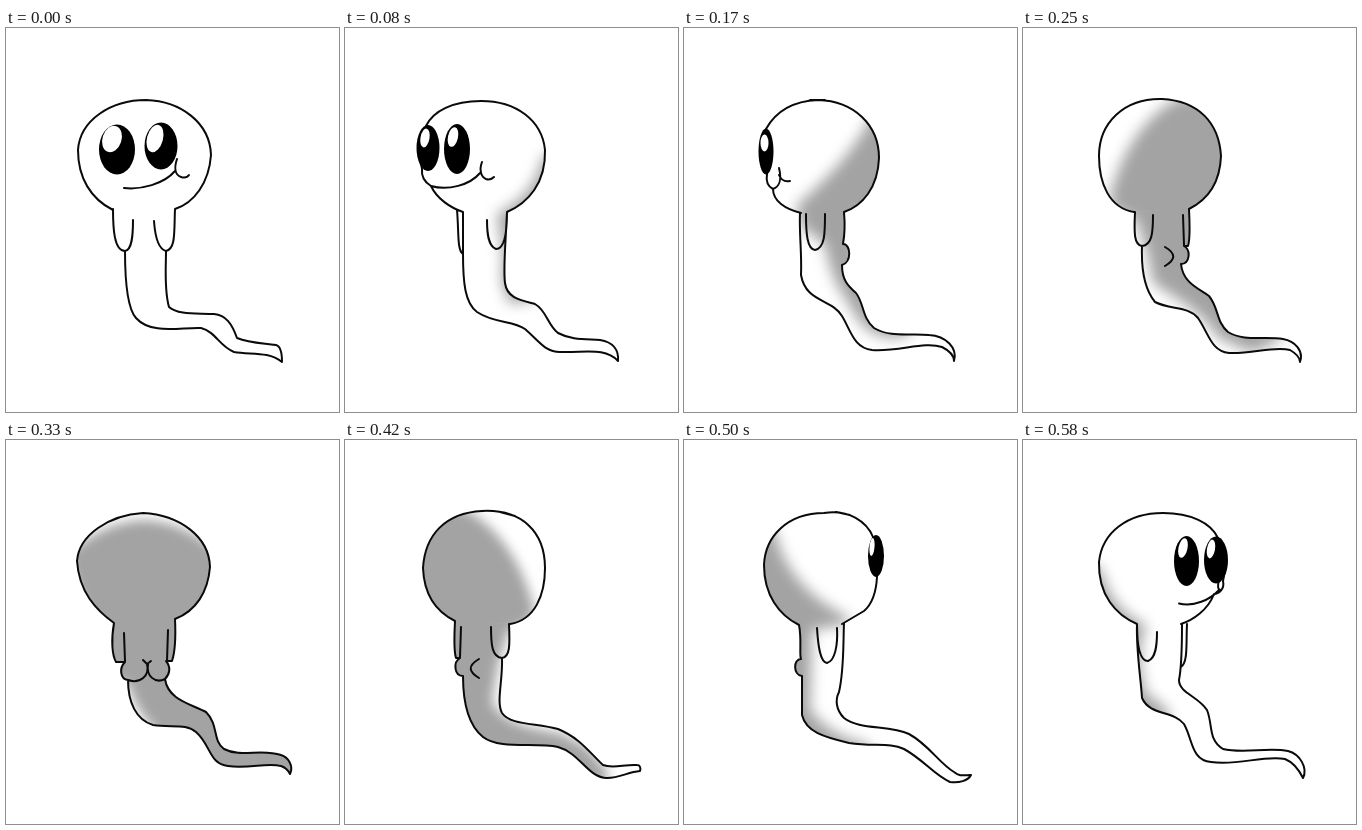
An HTML page for the animation above (660 ms loop, 333x384 px).

```html
<!DOCTYPE html>
<html lang="en">
<head>
<meta charset="utf-8">
<title>Spinning tadpole</title>
<style>
html, body { margin: 0; width: 100%; height: 100%; overflow: hidden; background: #fff; }
svg { display: block; width: 100vw; height: 100vh; }
.line { fill: none; stroke: #0a0a0a; stroke-width: 2; stroke-linecap: round; stroke-linejoin: round; }
</style>
</head>
<body>
<svg id="stage" viewBox="0 0 333 384"></svg>
<script>
const LOOP = 660;

// One pose per turn step. eye: [cx, cy, rx, ry, glint cx, cy, rx, ry, tilt]
const poses = [
  { at: 0,
    head: 'M107 182C85 171 72 150 72 122C74 92 105 72 140 72C175 73 204 95 205 127C203 155 188 175 169 181',
    body: 'M107 181C107 200 108 223 119 223C119 250 121 280 130 290C145 307 175 299 195 300C210 304 213 318 228 324C245 327 262 323 276 334C276 325 274 318 270 317C255 315 243 315 231 310C226 296 220 287 208 286C190 285 172 287 163 279C158 262 160 240 160 223C170 221 168 203 169 181',
    lines: 'M119 223C126 222 127 208 127 192M148 193C149 207 152 221 160 223M118 160C135 162 158 156 169 143M171 131C168 140 169 147 175 149C178 150 181 150 183 147',
    eyes: [[111, 121.5, 18, 25, 106, 111, 9.5, 13.5, 18], [155, 118, 16.5, 23.5, 149, 110.5, 8, 14, 15]] },
  { at: 80,
    head: 'M162 184C183 175 201 155 200 122C197 92 171 73 136 73C108 73 88 83 81 98L74 125L77 141C76 150 81 155 86 158C92 171 106 180 118 184',
    body: 'M118 184L118 226C118 255 120 275 132 284C150 296 168 292 180 301C195 314 200 324 215 324C240 325 260 319 273 333C274 322 268 314 255 312C240 311 226 312 213 305C202 296 202 283 190 276C175 272 162 270 160 255C158 240 161 210 162 184',
    lines: 'M142 192C142 205 143 218 151 221C159 221 162 205 162 184M118 226C112 222 114 205 112 182M86 158C103 163 125 157 135 145M137 134C134 142 136 149 141 151C144 152 147 151 149 149',
    shade: 'M216 125L198 128C192 158 174 175 152 186L158 225L157 255L165 276L195 270L186 210Z',
    eyes: [[112, 121, 13, 25, 108, 109, 5, 10, 12], [83, 120, 11.5, 23, 80, 110, 4.5, 9.5, 10]] },
  { at: 170,
    head: 'M117 185C101 181 89 173 89 161C83 158 82 152 83 146L82 101C92 83 110 73 134 72C170 73 195 97 195 130C194 160 178 178 160 184',
    body: 'M116 185C115 205 118 225 117 247C122 275 147 270 158 288C167 303 170 320 188 322C215 324 240 313 258 319C266 323 270 328 270 333C274 320 262 308 245 307C225 305 207 310 190 300C178 290 180 275 172 265C164 258 158 252 158 237C168 234 167 216 159 216C161 205 161 195 160 184',
    lines: 'M122 186C122 205 123 221 131 222C141 220 141 205 141 186M89 161C95 159 98 152 95 140M95 147C97 152 101 154 106 153M126 72L141 72',
    shade: 'M210 70L188 88C172 118 150 145 112 178L118 200L140 215C146 240 150 255 160 268C170 285 176 300 192 306C205 312 215 310 225 306L230 295L190 280L175 230L170 190L215 170Z',
    eyes: [[82, 123.5, 7.5, 23, 80.5, 115, 4, 8.5, 0]] },
  { at: 250,
    head: 'M166 181C184 172 197 155 198 128C196 95 176 73 139 71C101 70 76 95 76 128C76 155 86 180 111 184',
    body: 'M112 184C111 205 111 217 119 218C118 245 122 262 132 274C148 282 165 278 175 290C186 306 188 323 206 325C230 326 250 318 267 322C274 326 277 330 277 334C281 323 272 313 260 311C240 308 222 314 205 304C193 294 196 280 186 268C175 260 160 255 158 236C167 236 168 222 161 218L165 218C167 212 167 200 166 181',
    lines: 'M160 187L161 217M142 219C154 226 152 232 142 238M119 218C129 217 130 205 130 187',
    shade: 'M216 60L155 70C118 90 96 130 86 172L96 186L112 190L124 225L130 255C160 275 180 285 195 310L230 325L260 310L200 240L216 200Z' },
  { at: 330,
    head: 'M108 183C90 170 73 152 71 121C73 95 103 75 137 73C173 75 203 96 204 127C202 152 190 171 169 179',
    body: 'M108 183C105 200 106 215 110 222L119 222C113 228 114 239 122 240C122 262 130 280 147 285C165 288 180 283 190 292C205 305 203 324 222 326C243 329 262 322 275 326C281 328 283 332 284 334C288 326 282 317 275 315C255 308 235 318 218 309C206 300 213 285 200 272C185 264 162 260 159 239C164 234 165 227 160 221L166 221C168 215 170 200 169 179',
    lines: 'M118 193L119 221M162 190L161 221M122 240C134 244 144 236 141 224M142 224C140 236 149 244 159 239M137 220L141 224L145 221',
    shade: 'M60 114C85 94 108 81 138 80C168 81 192 94 215 114L215 190L300 300L300 345L200 345L158 300C138 280 126 262 122 243L100 245Z',
    blur: 6 },
  { at: 420,
    head: 'M110 181C92 172 79 155 78 128C80 95 100 73 137 71C177 69 200 92 200 128C200 155 190 180 165 184',
    body: 'M110 181C109 200 109 212 111 218L115 218C108 222 109 236 118 236C118 262 123 285 138 297C155 310 190 302 213 307C235 313 243 338 262 338C275 338 283 332 295 331C296 328 295 325 292 325C280 324 268 329 258 325C245 313 235 298 213 289C190 283 165 285 157 273C151 262 158 240 157 218C165 217 165 205 164 184',
    lines: 'M116 187L115 217M134 219C122 226 124 232 134 238M146 187C146 205 147 217 157 218M155 72L170 76',
    shade: 'M60 60L121 70C158 90 180 130 190 172L180 186L164 190L153 225L147 262C156 280 178 288 215 293L242 307L262 330L262 345L110 330L60 200Z',
    blur: 6 },
  { at: 500,
    head: 'M115 185C95 175 80 155 80 125C81 97 103 73 140 73C165 69 183 82 189 97L193 137C192 155 187 165 180 171L158 184',
    body: 'M115 185C118 200 115 215 117 219C109 219 109 235 118 236L118 275C122 292 140 297 165 303C190 307 205 302 220 309C240 320 250 335 266 342C275 343 284 341 287 335C280 335 276 337 270 332C255 323 245 305 225 294C205 285 175 290 160 278C152 270 151 260 155 252C160 230 159 210 160 183',
    lines: 'M133 188C134 205 136 222 143 223C151 221 154 205 153 188M152 72L166 75',
    shade: 'M60 85L90 88C98 125 120 155 165 178L165 184L128 190L126 270C140 288 160 300 185 304L185 320L100 310L60 200Z',
    eyes: [[192, 116, 8, 21, 188, 107, 2.5, 9, 5]] },
  { at: 580,
    head: 'M114 184C93 175 75 155 76 122C79 92 105 73 140 73C168 73 188 83 195 98L203 125L200 141C202 150 195 154 191 154C185 170 170 180 158 184',
    body: 'M114 184C113 210 118 240 119 258C127 276 150 270 161 284C170 300 168 320 188 322C215 326 240 315 262 319C272 323 277 332 280 338C285 328 277 314 265 311C245 307 220 314 200 309C185 300 190 285 184 270C175 256 156 253 156 240C158 230 159 220 159 184',
    lines: 'M114 184C114 205 117 221 125 221C133 218 134 205 134 192M158 227C165 222 163 205 164 184M156 163.5C171 167 187 160 196 150M196 141C194 146 195 150 198 150',
    shade: 'M60 125L78 128C84 158 102 175 124 186L118 200L117 225L122 252L145 270L145 290L90 270Z',
    eyes: [[163.5, 121, 12.5, 25, 160, 108, 4.5, 10, 12], [193, 120, 12, 23.5, 188, 109, 4, 9.5, 10]] }
];

const stage = document.getElementById('stage');

const ellipse = (x, y, rx, ry, fill, tilt = 0) =>
  `<ellipse cx="${x}" cy="${y}" rx="${rx}" ry="${ry}" fill="${fill}" transform="rotate(${tilt} ${x} ${y})"/>`;

const drawEye = ([x, y, rx, ry, gx, gy, grx, gry, tilt]) =>
  ellipse(x, y, rx, ry, '#000') + ellipse(gx, gy, grx, gry, '#fff', tilt);

function drawPose({ head, body, lines, shade, blur = 7, eyes = [] }, i) {
  const shading = shade ? `
    <clipPath id="skin${i}"><path d="${head}"/><path d="${body}"/></clipPath>
    <filter id="soft${i}" filterUnits="userSpaceOnUse" x="0" y="0" width="333" height="384" color-interpolation-filters="sRGB">
      <feGaussianBlur stdDeviation="${blur}"/>
    </filter>
    <g clip-path="url(#skin${i})"><path d="${shade}" fill="#a3a3a3" filter="url(#soft${i})"/></g>` : '';
  return `<g visibility="hidden">${shading}
    <path class="line" d="${head}${body}${lines}"/>${eyes.map(drawEye).join('')}</g>`;
}

stage.innerHTML = poses.map(drawPose).join('');
const layers = [...stage.children];
let shown = -1;

function render(ms) {
  const t = ms % LOOP;
  const now = poses.filter(p => p.at <= t).length - 1;
  if (now === shown) return;
  layers.forEach((g, i) => g.setAttribute('visibility', i === now ? 'visible' : 'hidden'));
  shown = now;
}

const start = performance.now();
function tick() {
  render(performance.now() - start);
  requestAnimationFrame(tick);
}
tick();
</script>
</body>
</html>
```
